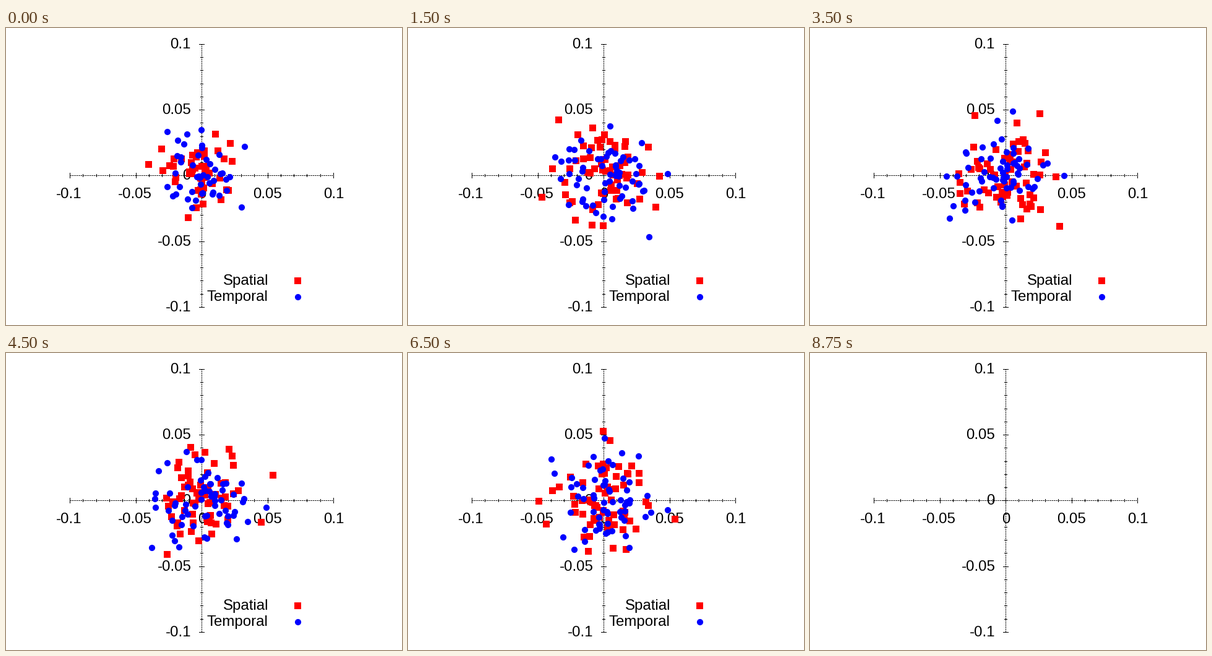
A matplotlib script that plays this animation: 640x480 px, repeating every 9000 ms.

```python
import matplotlib.pyplot as plt
import numpy as np
from matplotlib.animation import FuncAnimation
from matplotlib.path import Path

W, H, DPI = 640, 480, 100
PX = 72 / DPI
STEPS, STEP_MS = 36, 250
CX, CY = 316, 238.4      # origin in pixels
SX, SY = 2130, 2125      # pixels per unit
RED, BLUE = "#ff0000", "#0000ff"

# Disc centred on the middle of a pixel
R = 5.1
DISC = Path.circle((0.5, -0.5), R)

plt.rcParams["font.family"] = "Liberation Sans"
fig = plt.figure(figsize=(W / DPI, H / DPI), dpi=DPI, facecolor="white")
ax = fig.add_axes([0, 0, 1, 1])
ax.set_xlim(0, W)
ax.set_ylim(H, 0)
ax.axis("off")


def line(x, y, style="-", cap="projecting"):
    ax.plot(x, y, color="black", lw=PX, linestyle=style, antialiased=False,
            solid_capstyle=cap, dash_capstyle="butt", zorder=1)


def label(x, y, s, ha):
    return ax.text(x, y, s, ha=ha, va="baseline", fontsize=24 * PX, zorder=2)


def squares(x=(), y=()):
    return ax.plot(x, y, ls="", marker="s", color=RED, ms=11 * PX, mew=0,
                   zorder=3)[0]


def discs(x=(), y=()):
    return ax.plot(x, y, ls="", marker=DISC, color=BLUE, mew=0,
                   ms=2 * (R + 0.5) * PX, antialiased=False, zorder=4)[0]


def draw_axes():
    dots = (0, (2, 2))
    line([CX - 0.1 * SX, CX + 0.1 * SX], [CY, CY], dots)
    line([CX, CX], [CY - 0.1 * SY, CY + 0.1 * SY], dots)
    for i in range(-10, 11):
        x, y = CX + i * SX / 100, CY - i * SY / 100
        major = i % 5 == 0
        r = 4 if major else 2
        line([x, x], [CY - r, CY + r])
        line([CX - r, CX + r], [y, y])
        if major:
            text = f"{i / 100:g}"
            minus = i < 0
            label(x + 0.5 - 1.5 * minus, 275, text, "center")
            label(298.5 + minus, y + 7, text, "right")


def cloud(rng, step):
    """Round normal scatter; the opening one is smaller and tighter."""
    count, sigma = (45, 0.016) if step == 0 else (64, 0.0185)
    pts = rng.normal(0, sigma, (2 * count, 2))
    pts = pts[np.hypot(*pts.T) < 3.2 * sigma][:count]
    return np.round(pts * (SX, SY) + (CX, CY))


draw_axes()
spatial, temporal = squares(), discs()
legend = [
    label(424, 415, "Spatial", "right"),
    label(423, 441, "Temporal", "right"),
    squares([471], [408]),
    discs([471], [434]),
]
rng = np.random.default_rng(7)
clouds = [(cloud(rng, k), cloud(rng, k)) for k in range(STEPS - 1)]


def update(step):
    shown = step < STEPS - 1  # the loop ends on bare axes
    artists = [spatial, temporal, *legend]
    for artist in artists:
        artist.set_visible(shown)
    if shown:
        for dots, pts in zip((spatial, temporal), clouds[step]):
            dots.set_data(*pts.T)
    return artists


anim = FuncAnimation(fig, update, frames=STEPS, interval=STEP_MS,
                     repeat=True, repeat_delay=0, blit=False)
plt.show()
```
